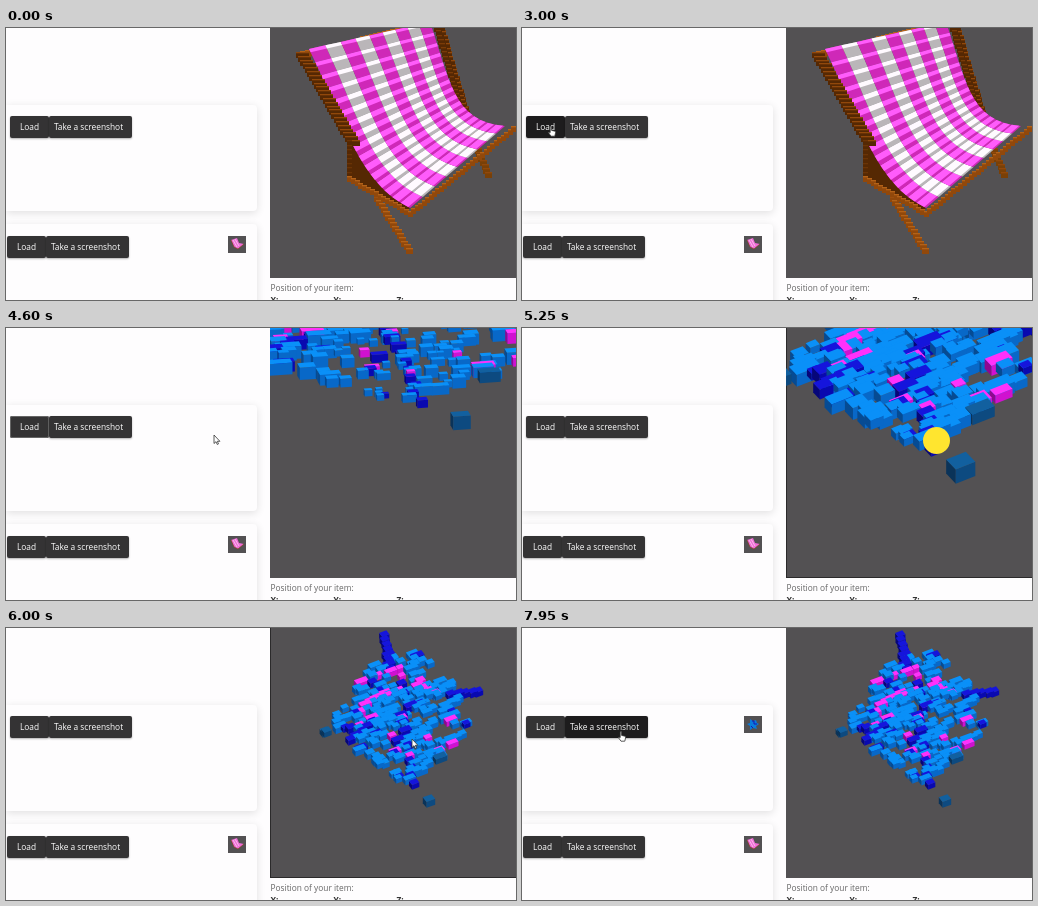
Write an HTML page with a canvas that moves like this. It is 510 px wide and 272 px high and loops after 8000 ms.

```html
<!DOCTYPE html>
<html lang="en">
<head>
<meta charset="utf-8">
<title>Voxel viewer</title>
<style>
  html, body { margin: 0; width: 100%; height: 100%; overflow: hidden; }
  #stage { position: relative; width: 510px; height: 272px; overflow: hidden; background: #fefdfe;
    font: 8.35px/20px "Open Sans", "Noto Sans", sans-serif; }
  #stage > *, .card > * { position: absolute; }
  .card { left: 0; width: 251px; height: 106px; border-radius: 0 4px 4px 0; background: #fefdfe;
    box-shadow: 0 2px 8px rgba(0, 0, 0, .12); }
  .buttons { display: flex; color: #fff; font-weight: 500; line-height: 22px; white-space: nowrap; }
  .buttons span { border-radius: 2px; background: #343334; text-align: center;
    box-shadow: 0 1px 2px rgba(0, 0, 0, .3); }
  .load { width: 39px; }
  .shot { width: 83px; text-indent: -4px; }
  .buttons .hover { background: #1d1c1d; }
  .buttons .focus { box-shadow: inset 0 0 0 1px #666; }
  .thumb { left: 222px; width: 18px; height: 17px; background: #535153; }
  .label { left: 264.5px; top: 250px; color: #666; white-space: nowrap; }
  .axes { left: 264.5px; top: 262px; color: #333; font-weight: 700; display: flex; }
  .axes b { width: 63px; }
  #view { left: 264px; top: 0; }
  #dot { left: 401px; top: 99px; width: 27px; height: 27px; border-radius: 50%; background: #ffe52f; }
  #pointer { left: 0; top: 0; overflow: visible; }
</style>
</head>
<body>
<div id="stage">
  <div class="card" style="top:77px">
    <div class="buttons" style="left:4px;top:11px">
      <span class="load" id="load">Load</span><span class="shot" id="shot">Take a screenshot</span>
    </div>
    <svg class="thumb" id="newThumb" style="top:10.5px" viewBox="0 0 18 17">
      <path d="M6 3l3 2 3-1 1 3 2 1-3 2 1 3-4-1-3 2v-4l-3-2 3-1z" fill="#087bdb"/>
      <path d="M8 5h2v3h3M7 10l2 2" stroke="#1517b5" fill="none"/>
    </svg>
  </div>
  <div class="card" style="top:196px">
    <div class="buttons" style="left:1px;top:12px">
      <span class="load">Load</span><span class="shot">Take a screenshot</span>
    </div>
    <svg class="thumb" style="top:12px" viewBox="0 0 18 17">
      <path d="M3 4l6-2 2 5 5 1-6 5-4-2z" fill="#f06bd8"/>
      <path d="M5 4l4 7m-2-8l4 7" stroke="#f9bdea" fill="none"/>
      <path d="M3 4l3 7 4 2 6-5" stroke="#7d4418" fill="none" stroke-width=".7"/>
    </svg>
  </div>
  <canvas id="view" width="246" height="250"></canvas>
  <div class="label">Position of your item:</div>
  <div class="axes"><b>X:</b><b>Y:</b><b>Z:</b></div>
  <div id="dot"></div>
  <svg id="pointer" width="10" height="14" stroke="#333" stroke-width=".8" fill="#fff">
    <path id="arrow" d="M0 0v8.5l2-1.8 1.3 2.8 1.2-.6-1.2-2.6h2.6z"/>
    <path id="hand" d="M1.2.8q.8-.8 1.4 0v3.6l3.4.8q.8.3.6 1.4l-.8 3.6h-3.8l-2.6-3.6q.2-1 1.8 0z"/>
  </svg>
</div>
<script>
const LOOP = 8000, SWAP = 3075;
const el = id => document.getElementById(id);
const ctx = el('view').getContext('2d');
const mix = (a, b, k) => a + (b - a) * k;
const mixAll = (a, b, k) => a.map((v, i) => mix(v, b[i], k));
const ease = k => k * k * (3 - 2 * k);

let seed = 41;
function random() {
  seed = (seed + 0x6D2B79F5) | 0;
  let h = Math.imul(seed ^ seed >>> 15, 1 | seed);
  h = h + Math.imul(h ^ h >>> 7, 61 | h) ^ h;
  return ((h ^ h >>> 14) >>> 0) / 4294967296;
}

// Each key is [time, value]; values are arrays, eased from one to the next.
function track(keys, t) {
  const i = keys.findIndex(key => key[0] > t);
  if (i < 0) return keys[keys.length - 1][1];
  if (!i) return keys[0][1];
  const [[t0, a], [t1, b]] = [keys[i - 1], keys[i]];
  return mixAll(a, b, ease((t - t0) / (t1 - t0)));
}

function polygon(color, ...points) {
  ctx.fillStyle = color;
  ctx.beginPath();
  points.forEach(p => ctx.lineTo(...p));
  ctx.fill();
}

// Chair
const bezier = ([a, b, c, d]) => k =>
  mixAll(mixAll(mixAll(a, b, k), mixAll(b, c, k), k), mixAll(mixAll(b, c, k), mixAll(c, d, k), k), k);

function beam(from, to, front, top, width = 7) {
  const n = Math.ceil(Math.hypot(to[0] - from[0], to[1] - from[1]) / 4.5);
  for (let i = 0; i <= n; i++) {
    const [x, y] = mixAll(from, to, i / n).map(Math.round);
    ctx.fillStyle = front;
    ctx.fillRect(x, y, width, 6);
    ctx.fillStyle = top;
    ctx.fillRect(x, y, width, 1.3);
  }
}

const ROWS = 16, COLUMNS = 9;
const leftEdge = bezier([[303, 21], [338, 92], [352, 155], [404, 180]]);
const rightEdge = bezier([[424, -6], [444, 52], [447, 94], [499, 98]]);

function fabric() {
  const at = (u, v) => mixAll(leftEdge(v), rightEdge(v), u * 1.25 / (1 + .25 * u));
  const patch = (color, u0, v0, u1, v1) =>
    polygon(color, at(u0, v0), at(u1, v0), at(u1, v1), at(u0, v1));
  for (let r = 0; r < ROWS; r++) {
    const v0 = r / ROWS, v1 = (r + 1) / ROWS, lit = mix(v0, v1, .25 + .6 * v0);
    for (let c = 0; c < COLUMNS; c++) {
      const u0 = c / COLUMNS, u1 = (c + 1) / COLUMNS, pink = c % 2 === 0;
      patch(pink ? '#cf28b8' : '#bab6b9', u0, v0, u1, v1);
      patch(pink ? '#ff5cfb' : '#fffaff', u0, v0, u1, lit);
    }
  }
}

function drawChair() {
  const wood = '#91480b', dark = '#552803', light = '#b36218';
  const corner = [402, 183], hip = [341, 112], heel = [341, 148], head = [290, 24];
  beam([427, -6], [454, 82], dark, '#7a3b07', 10);
  beam([434, -6], [460, 88], dark, wood, 4);
  beam([458, 96], [479, 144], '#794007', wood);
  polygon(dark, hip, [350, 112], [405, 178], corner, heel);
  beam(head, [410, -5], wood, light);
  fabric();
  beam(head, hip, dark, wood, 13);
  beam(hip, heel, dark, '#6b3406', 5);
  beam([368, 168], [400, 220], wood, light);
  beam(heel, corner, wood, light, 5);
  beam(corner, [505, 98], wood, light, 5);
}

// Blocks: top, front and side colour
const palette = {
  sky: ['#0a90f8', '#0868c8', '#064b93'],
  navy: ['#1515dc', '#0909b0', '#060679'],
  pink: ['#ff31fb', '#d011d0', '#8f088f'],
  steel: ['#12609f', '#0d4a80', '#0a3359']
};
const CENTER = [402, 104];
const blocks = [];

function addBlock(x, y, color, grow = mix(.6, 1.25, random())) {
  blocks.push({ x: x - CENTER[0], y: y - CENTER[1], color, grow, length: random() < .3 ? 1.5 : 1 });
}

function addRow(from, to, n, color) {
  for (let i = 0; i < n; i++) {
    const [x, y] = mixAll(from, to, i / (n - 1));
    addBlock(x + random() * 3 - 1.5, y, color, 1);
  }
}

for (let i = 0; i < 235; i++) {
  const angle = random() * 2 * Math.PI, c = Math.cos(angle), s = Math.sin(angle);
  const r = Math.pow(random(), .62) * 1.16 / Math.pow(Math.abs(c) + Math.abs(s), .6);
  const pick = random();
  addBlock(398 + r * c * 63, 87 + r * s * 58, pick < .09 ? 'pink' : pick > .92 ? 'navy' : 'sky');
}
addRow([379, 8], [384, 42], 8, 'navy');
addRow([396, 88], [407, 156], 10, 'navy');
addRow([446, 67], [472, 64], 5, 'navy');
addRow([345, 112], [366, 95], 5, 'navy');
addRow([358, 77], [380, 66], 5, 'pink');
addRow([412, 58], [430, 66], 4, 'pink');
addRow([320, 104], [320, 104], 2, 'steel');
addBlock(434, 130, 'steel', 1.1);
addBlock(423, 173, 'steel', 1.5);
blocks.sort((a, b) => a.y - b.y);

function drawBlock(x, y, size, length, yaw, pitch, [top, front, side]) {
  const sy = Math.sin(yaw), cy = Math.cos(yaw), sp = Math.sin(pitch), cp = Math.cos(pitch);
  // corner offsets along the block's width, depth and height
  const at = (u, v, w) => {
    const a = (u - .5) * size * length, b = (v - .5) * size * .8, c = (w - .5) * size * .8;
    return [x + a * cy - b * sy, y - (a * sy + b * cy) * sp - c * cp];
  };
  polygon(side, at(0, 0, 0), at(0, 1, 0), at(0, 1, 1), at(0, 0, 1));
  polygon(front, at(0, 0, 0), at(1, 0, 0), at(1, 0, 1), at(0, 0, 1));
  polygon(top, at(0, 0, 1), at(1, 0, 1), at(1, 1, 1), at(0, 1, 1));
}

// center x, y; scale x, y; block size; growth towards the sides; yaw; pitch
const near = [400, 20, 2.6, 1.05, 10, .09, .2, .35];
const turned = [402, 50, 1.75, 1.3, 16, 0, .55, .7];
const far = [...CENTER, 1, 1, 8.2, 0, .5, .75];
const camera = [[4950, near], [5220, turned], [5300, turned], [5880, far]];

function drawBlocks(t) {
  const [cx, cy, sx, sy, size, spread, yaw, pitch] = track(camera, t);
  const evenness = (sx - 1) / (near[2] - 1);
  for (const b of blocks) {
    const grow = mix(1, b.grow, Math.min(1, .4 + evenness));
    drawBlock(cx + b.x * sx, cy + b.y * sy, (size + Math.abs(b.x) * spread) * grow,
      b.length, yaw, pitch, palette[b.color]);
  }
}

// Pointer stops
const below = [165, 285], card = [146, 218], load = [27, 98];
const idle = [208, 107], press = [414, 112], rest = [406, 111], shot = [97, 103];
const pointer = [
  [850, below], [1200, card], [1400, card], [2450, load], [3400, load], [4450, idle],
  [4650, idle], [4950, press], [5250, press], [5880, rest], [6800, rest], [7500, shot]
];
const show = (node, on) => { node.style.visibility = on ? 'visible' : 'hidden'; };

function render() {
  const t = performance.now() % LOOP;
  ctx.setTransform(1, 0, 0, 1, 0, 0);
  ctx.fillStyle = '#535153';
  ctx.fillRect(0, 0, 246, 250);
  if (t > 5000 && t < 7400) {
    ctx.fillStyle = '#2b2a2b';
    ctx.fillRect(0, 249, 246, 1);
    ctx.fillRect(0, 0, 1, 250);
  }
  ctx.translate(-264, 0);
  if (t < SWAP) drawChair(); else drawBlocks(t);

  const [x, y] = track(pointer, t);
  const overLoad = t > 2380 && t < 3560, overShot = t > 7400, pressed = t > 5080 && t < 5450;
  el('pointer').style.transform = `translate(${x}px, ${y}px)`;
  show(el('arrow'), !overLoad && !overShot && !pressed);
  show(el('hand'), overLoad || overShot);
  show(el('dot'), pressed);
  show(el('newThumb'), t >= 7800);
  el('load').classList.toggle('hover', overLoad);
  el('load').classList.toggle('focus', t > SWAP && t < 5000);
  el('shot').classList.toggle('hover', overShot);
  requestAnimationFrame(render);
}
render();
</script>
</body>
</html>
```
